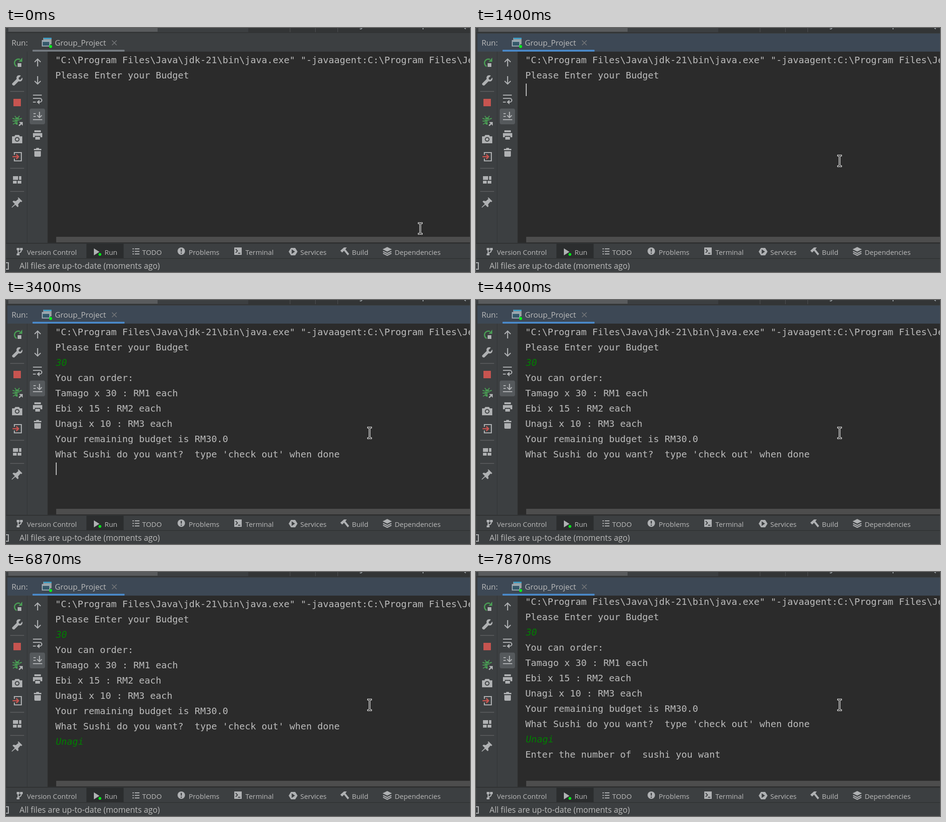
Recreate the animation shown at these times as an HTML page. Size 998x527 px, loop 8 s.

```html
<!DOCTYPE html>
<html lang="en">
<head>
<meta charset="utf-8">
<title>Run console</title>
<style>
  html, body { margin: 0; width: 100%; height: 100%; overflow: hidden; background: #3c3f41; }
  svg { display: block; width: 998px; height: 527px; }
  text { white-space: pre; }
  .ui { font-family: "Open Sans", "Noto Sans", sans-serif; fill: #bbb; }
  .mono { font: 19.93px "DejaVu Sans Mono", monospace; font-variant-ligatures: none; fill: #bbb; }
  .input { fill: #007f00; }
  .icon { fill: #afb1b3; }
  .line { fill: none; stroke: #afb1b3; stroke-width: 2.2; }
  .rule { stroke: #555759; stroke-width: 2; }
</style>
</head>
<body>
<svg viewBox="0 0 998 527" xmlns="http://www.w3.org/2000/svg">
  <defs>
    <clipPath id="view"><rect x="90" y="51" width="908" height="399"/></clipPath>
  </defs>
  <rect width="998" height="527" fill="#3c3f41"/>

  <!-- strip above the tool window -->
  <rect x="521" width="477" height="9" fill="#333536"/>
  <rect x="5" width="321" height="8" fill="#595b5d"/>
  <rect y="9" width="998" height="2" fill="#323435"/>
  <path d="M611 0V9M665.500 0V9M713.500 0V9" stroke="#505254"/>
  <path d="M766 0l-2 2h-3M897 0v3M986 0l3 2" fill="none" stroke="#a9b0b5" stroke-width="1.6"/>

  <!-- header -->
  <rect id="head" x="3" y="12" width="995" height="39"/>
  <rect y="11" width="3" height="453" fill="#37393b"/>
  <text class="ui" x="12" y="38" font-size="16.5">Run:</text>
  <text class="ui" x="105" y="38" font-size="16.6">Group_Project</text>
  <path d="M228 27l10 10m0-10l-10 10" stroke="#77797b" stroke-width="1.5"/>
  <rect id="tab" x="57" y="47" width="198" height="4" rx="1"/>
  <path class="icon" d="M80 21h18v14h-3v-9H80z" opacity=".8"/>
  <path d="M77 26h18v14H77z" fill="#9aa7b0"/>
  <path d="M79 30h14v8H79z" fill="#35596b"/>
  <path d="M81 21h17v3H81z" fill="#3c9dc4"/>
  <circle cx="96" cy="40" r="3.2" fill="#00f019"/>

  <!-- console -->
  <rect x="90" y="51" width="908" height="413" fill="#2b2b2b"/>
  <path d="M45.500 51V464M89.500 51V464" stroke="#323435"/>
  <g clip-path="url(#view)"><g id="out"></g></g>
  <rect id="caret" width="2" height="27" fill="#bbb"/>
  <rect x="108" y="451" width="890" height="12" fill="#4d4d4d"/>

  <!-- first tool column -->
  <path d="M30 68A8 8 0 1 0 23 83" fill="none" stroke="#499c54" stroke-width="2.8"/>
  <path d="M27 73h8v-9z" fill="#499c54"/>
  <path class="icon" d="M25 76h8v8h-8z"/>
  <path class="icon" d="M14 119l9-9c-2-6 4-10 9-7l-5 5 1 3 3 1 4-5c2 6-3 10-8 8l-9 9q-2 1-4-1t0-4z"/>
  <path class="rule" d="M9 137H39M9 303H39M9 353H39"/>
  <rect x="16" y="153" width="16" height="16" fill="#c75450"/>
  <g stroke="#499c54" fill="none" stroke-width="2">
    <path d="M14 195l5 2M14 201h6M15 208l5-3M19 190l3 4M29 190l-3 4M34 195l-5 2"/>
    <ellipse cx="24" cy="201" rx="5.500" ry="8" fill="#499c54" stroke="none"/>
    <path d="M18 198h12M18 203h12" stroke="#3c3f41" stroke-width="1"/>
  </g>
  <path d="M25 200h12v12H25z" fill="#3c3f41"/>
  <path class="icon" d="M28 203h8v8l-3-3-4 4-2-2 4-4z"/>
  <path class="icon" fill-rule="evenodd" d="M13 234h5l2-3h8l2 3h5v15H13zM24 235.500a5 5 0 1 0 .1 0z"/>
  <circle class="icon" cx="24" cy="240.500" r="3"/>
  <path class="line" d="M18 274v-5h15v18H18v-5" stroke-width="2.600"/>
  <path d="M14 278h12M22 273l5 5-5 5" fill="none" stroke="#c75450" stroke-width="2.600"/>
  <path class="icon" d="M15 320h11v8H15zM28 320h5v8h-5zM15 330h8v6h-8zM25 330h8v6h-8z"/>
  <path class="icon" d="M27 366l8 8-2 2-2-1-5 6 1 4-2 2-5-5-7 6-1-1 7-7-5-5 2-2 5 1 6-5-2-2z"/>

  <!-- second tool column -->
  <path class="line" id="up" d="M68 83V67M61.500 73.500l6.500-6.500 6.500 6.500" stroke-width="2.600"/>
  <path class="line" d="M68 104v16M61.500 114.500l6.500 6.500 6.500-6.500" stroke-width="2.600"/>
  <path class="line" d="M58 145h19M58 152h15a4 4 0 0 1 0 8h-4M58 160h6"/>
  <path class="icon" d="M72 155v10l-6-5z"/>
  <rect x="51" y="174" width="33" height="34" rx="4" fill="#55595c"/>
  <path class="line" d="M59 185h5M59 191h5M58 198h20M72 181v12M67 188.500l5 5 5-5"/>
  <path class="icon" d="M61 221h14v4H61zM58 227h20v9h-4v-3H62v3h-4zM63 235h10v6H63z"/>
  <path class="icon" d="M65 259h6v2h5v3H60v-3h5zM61 266h14v10q0 2-2 2H63q-2 0-2-2z"/>

  <!-- bottom bars -->
  <rect y="464" width="998" height="2" fill="#303233"/>
  <rect x="173" y="466" width="80" height="32" fill="#2b2d2e"/>
  <rect y="497" width="998" height="1.500" fill="#303233"/>
  <g id="labels" class="ui" font-size="14.9"></g>
  <text class="ui" x="29" y="520" font-size="17.25">All files are up-to-date (moments ago)</text>
  <path class="line" d="M0 507h5v14H0" stroke-width="1.500"/>

  <path class="line" d="M26 478v12M33 478v2q0 5-7 6"/>
  <path class="icon" d="M23 475h6v5h-6zM30 475h6v5h-6zM23 487h6v4h-6z"/>
  <path class="icon" d="M189 476l12 7.500-12 7.500z"/>
  <circle cx="202" cy="489" r="3" fill="#00f019"/>
  <path class="line" d="M272 477h3M277 477h10M272 482.500h3M277 482.500h10M272 488h3M277 488h10"/>
  <circle class="icon" cx="377" cy="482" r="8"/>
  <path d="M377 477v6M377 485v2.500" stroke="#3c3f41" stroke-width="2.400"/>
  <path class="icon" d="M491 474h16v16h-16z"/>
  <path d="M494 477.500l4 4-4 4M499 486.500h5" fill="none" stroke="#3c3f41" stroke-width="1.800"/>
  <path class="icon" d="M613 475h9l5 8-5 8h-9l-5-8z"/>
  <path d="M614.500 478l7 5-7 5z" fill="#3c3f41"/>
  <path class="icon" d="M719 481l8-7h6l-3 4 8 10-3 3-8-10-4 4z"/>
  <path class="icon" d="M820 473l10 5-10 5-10-5z"/>
  <path class="line" d="M811 482.500l9 4.500 9-4.500M811 486.500l9 4.500 9-4.500" stroke-width="1.900"/>

  <!-- text pointer, centred on its own origin -->
  <g id="beam" fill="none">
    <path d="M-5-11.500H-1.500L0-10.500 1.500-11.500H5M0-11V11M-5 11.500H-1.500L0 10.500 1.500 11.500H5" stroke="#fff" stroke-width="3.600"/>
    <path d="M-4-11.500H-1.500L0-10.500 1.500-11.500H4M0-11V11M-4 11.500H-1.500L0 10.500 1.500 11.500H4" stroke="#111" stroke-width="1.400"/>
  </g>
</svg>
<script>
const LOOP = 8000, LEFT = 106, ROW = 33;
const $ = id => document.getElementById(id);

function addText(parent, str, attrs) {
  const el = document.createElementNS("http://www.w3.org/2000/svg", "text");
  for (const k in attrs) el.setAttribute(k, attrs[k]);
  el.textContent = str;
  parent.append(el);
  return el;
}

[["Version Control", 45], ["Run", 212], ["TODO", 293], ["Problems", 393], ["Terminal", 515],
 ["Services", 633], ["Build", 744], ["Dependencies", 836]]
  .forEach(([name, x]) => addText($("labels"), name, { x, y: 490 }));

// Console lines: text, time shown; typed lines carry a time per character.
const lines = [
  ['"C:\\Program Files\\Java\\jdk-21\\bin\\java.exe" "-javaagent:C:\\Program Files\\Je', 0],
  ["Please Enter your Budget", 0],
  ["30", [2200, 2670]],
  ["You can order:", 3400],
  ["Tamago x 30 : RM1 each", 3400],
  ["Ebi x 15 : RM2 each", 3400],
  ["Unagi x 10 : RM3 each", 3400],
  ["Your remaining budget is RM30.0", 3400],
  ["What Sushi do you want?  type 'check out' when done", 3400],
  ["Unagi", [4670, 5470, 5600, 5730, 5870]],
  ["Enter the number of  sushi you want", 7130]
].map(([str, at], row) => {
  const typed = Array.isArray(at);
  const el = addText($("out"), str, {
    class: typed ? "mono input" : "mono",
    transform: `translate(${LEFT} ${76 + row * ROW})` + (typed ? " skewX(-9)" : "")
  });
  return { el, str, at, typed };
});

// [time, row, column]; row -1 hides the caret
const caretSteps = [
  [0, -1, 0], [1400, 2, 0], [2200, 2, 1], [2670, 2, 2], [3200, 3, 0], [3400, 9, 0],
  [4400, -1, 0], [4670, 9, 1], [5400, -1, 0], [5470, 9, 2], [5600, 9, 3], [5730, 9, 4],
  [5870, 9, 5], [6870, -1, 0], [7130, 11, 0], [7870, -1, 0]
];
const beamSteps = [[0, 891, 433], [70, 850, 378], [130, 802, 313], [200, 783, 288], [470, 782, 287]];

const stepAt = (steps, t) => steps.filter(s => s[0] <= t).pop();

function render(t) {
  const focused = t >= 1400, scrolled = t >= 7130;
  $("head").setAttribute("fill", focused ? "#3d4855" : "#3c3f41");
  $("tab").setAttribute("fill", focused ? "#4a88c7" : "#747a80");
  $("out").setAttribute("transform", `translate(0 ${scrolled ? -5 : 0})`);

  for (const { el, str, at, typed } of lines) {
    const shown = typed ? str.slice(0, at.filter(a => a <= t).length) : t >= at ? str : "";
    if (el.textContent !== shown) el.textContent = shown;
  }

  const [, row, col] = stepAt(caretSteps, t);
  const caret = $("caret");
  caret.setAttribute("visibility", row < 0 ? "hidden" : "visible");
  caret.setAttribute("x", Math.floor(107 + 11.94 * col));
  caret.setAttribute("y", 54 + row * ROW - (scrolled ? 4 : 0));

  const [, x, y] = stepAt(beamSteps, t);
  $("beam").setAttribute("transform", `translate(${x} ${y})`);
}

const start = performance.now();
function tick() {
  render((performance.now() - start) % LOOP);
  requestAnimationFrame(tick);
}
tick();
</script>
</body>
</html>
```
